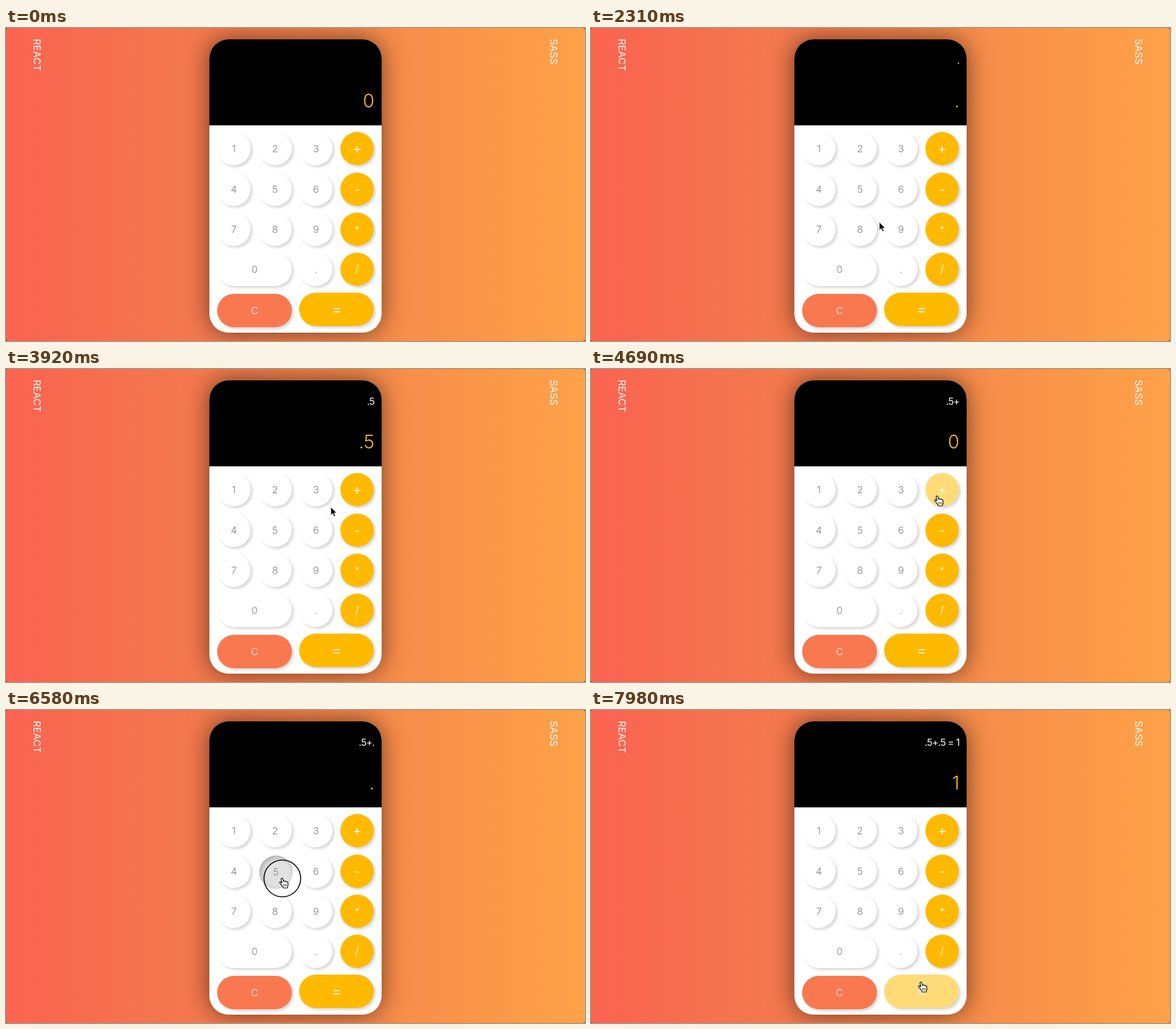
Recreate the animation shown at these times as an HTML page. Size 968 by 524 pixels, loop 8 s.

```html
<!DOCTYPE html>
<html lang="en">
<head>
<meta charset="utf-8">
<title>Calculator</title>
<style>
html, body { margin: 0; width: 100%; height: 100%; overflow: hidden; background: #7a4030; }
#stage {
  position: absolute; left: 0; top: 0; width: 968px; height: 524px; overflow: hidden; border-radius: 4px;
  background: linear-gradient(90deg, #fb6450, #f8694f 92px, #f4734e 222px, #f5804c 440px, #f8904a 700px, #fc9a48 850px, #fea148);
}
#calc {
  position: absolute; left: 340px; top: 19px; width: 288px; height: 491px;
  border-radius: 32px; background: #fff; box-shadow: 0 0 40px rgba(0,0,0,.55);
}
#screen { height: 144px; background: #000; border-radius: 32px 32px 0 0; }
.key {
  position: absolute; height: 56px; border-radius: 28px; background: #fff;
  box-shadow: 3px 3px 4px #d6d6d6;
}
.op { background: #ffba00; }
.clear { background: #f97850; }
.num.on { background: #e1e1e1; transform: translate(1.5px, 1.5px); box-shadow: inset 3px 3px 9px rgba(0,0,0,.24); }
.op.on { background: #ffdb78; }
.clear.on { background: #fbb39b; }
svg { position: absolute; left: 0; top: 0; font-family: Inter, "Open Sans", sans-serif; font-weight: 300; }
.label { text-anchor: middle; }
.side { font-size: 16.5px; fill: #fff; font-weight: 400; }
#expr { font-size: 16px; letter-spacing: -.7px; fill: #fff; text-anchor: end; font-weight: 400; }
#value { font-size: 31px; fill: #fdb82c; text-anchor: end; }
</style>
</head>
<body>
<div id="stage">
  <div id="calc"><div id="screen"></div></div>
  <div id="keys"></div>
  <svg width="968" height="524" viewBox="0 0 968 524">
    <text class="side" transform="translate(46 18) rotate(90)">REACT</text>
    <text class="side" transform="translate(910 18) rotate(90)">SASS</text>
    <text id="expr" x="616" y="60"></text>
    <text id="value" x="616" y="133"></text>
    <g id="labels"></g>
    <circle id="ring" fill="none" stroke="#000" stroke-width="1.6"/>
    <g id="cursor">
      <path id="arrow" d="M0 0V13.8L3.2 10.8L5.5 16L7.8 15L5.6 10H9.8Z" fill="#000" stroke="#fff" stroke-width=".9"/>
      <g id="hand" stroke="#000" stroke-linejoin="round" stroke-linecap="round">
        <path d="M-2 1.2C-2.2-.6 .6-.9 1 .9L2 5C2.6 4 4.3 4.1 4.6 5.2C5.4 4.4 6.8 4.6 7.1 5.8C8 5.2 9.2 5.8 9.3 7L9.6 10.5C9.6 12.5 8.8 13.5 8.4 16H1.8C1.5 14-1 12-2.6 9.6C-4.4 7.4-5 6.4-4 5.8C-2.8 5.2-1.6 6.6-.6 7.6Z" fill="#fff" stroke-width="1.2"/>
        <path d="M2.4 9.8V13M4.7 9.8V13M7 9.8V13" stroke-width=".8"/>
      </g>
    </g>
  </svg>
</div>
<script>
const LOOP = 8000, STEP = 70;
const $ = id => document.getElementById(id);
const cols = [353, 421.7, 490.3, 559], rows = [174, 241.5, 308.5, 375.5];
const keys = [];

function addKey(text, x, y, w, kind, size = 16.5, drop = 6) {
  const el = document.createElement('div');
  el.className = 'key ' + kind;
  Object.assign(el.style, { left: x + 'px', top: y + 'px', width: w + 'px' });
  $('keys').append(el);
  const label = document.createElementNS('http://www.w3.org/2000/svg', 'text');
  label.textContent = text;
  label.setAttribute('class', 'label');
  label.setAttribute('x', x + w / 2);
  label.setAttribute('y', y + 28 + drop);
  label.setAttribute('font-size', size);
  label.setAttribute('fill', kind === 'num' ? '#808080' : '#fff');
  $('labels').append(label);
  keys.push({ x, y, w, kind, el, label });
}

for (let n = 0; n < 9; n++) addKey(n + 1, cols[n % 3], rows[n / 3 | 0], 56, 'num');
addKey('0', cols[0], rows[3], 125, 'num');
addKey('.', cols[2], rows[3], 56, 'num');
// operator: text, font size, baseline below the centre
[['+', 24, 8.3], ['-', 21, 8.5], ['*', 16, 6], ['/', 18, 6.5]]
  .forEach(([s, size, drop], i) => addKey(s, cols[3], rows[i], 56, 'op', size, drop));
addKey('C', cols[0], 444.5, 125, 'clear');
addKey('=', cols[2], 443, 125, 'op', 26, 8.5);

const ease = {
  in: u => u * u,
  out: u => 1 - (1 - u) * (1 - u),
  both: u => u * u * (3 - 2 * u)
};
// pointer: time, x, y, easing on the way there
const path = [
  [140, 545, 534], [980, 522, 409, 'out'], [1470, 522, 409], [1890, 518, 396, 'both'], [2030, 518, 396],
  [2310, 482, 325, 'in'], [2940, 455, 278, 'out'], [3570, 455, 278], [3920, 543, 231, 'in'],
  [4480, 579, 213, 'out'], [4830, 579, 213], [5670, 521, 405, 'both'], [5880, 521, 405],
  [6510, 462, 282, 'both'], [6930, 462, 282], [7770, 552, 456, 'both'], [8000, 552, 456]
];
// press time, time the display answers, expression, value
const clicks = [
  [980, 1120, '.', '.'], [3430, 3500, '.5', '.5'], [4550, 4690, '.5+', '0'],
  [5740, 5880, '.5+.', '.'], [6510, 6650, '.5+.5', '.5'], [7840, 7980, '.5+.5 = 1', '1']
];

function pointer(t) {
  const i = Math.max(1, path.findIndex(p => p[0] >= t));
  const [t0, x0, y0] = path[i - 1], [t1, x1, y1, kind] = path[i];
  const k = ease[kind || 'both']((t - t0) / (t1 - t0));
  return [x0 + (x1 - x0) * k, y0 + (y1 - y0) * k];
}

function inside(k, x, y) {
  const nearX = Math.min(Math.max(x, k.x + 28), k.x + k.w - 28);
  return Math.hypot(x - nearX, y - k.y - 28) < 28;
}

function show(el, on) { el.style.display = on ? '' : 'none'; }

function draw(t) {
  const visible = t >= 210;
  const [x, y] = visible ? pointer(t) : [-50, -50];
  let hover = false;
  for (const k of keys) {
    const on = t >= 1050 && inside(k, x, y);
    hover = hover || on;
    k.el.classList.toggle('on', on);
    k.label.setAttribute('transform', on && k.kind === 'num' ? 'translate(1.5 1.5)' : '');
  }
  show($('cursor'), visible);
  show($('arrow'), !hover);
  show($('hand'), hover);
  $('cursor').setAttribute('transform', `translate(${x} ${y})`);

  const last = clicks.filter(c => t >= c[1]).pop();
  $('expr').textContent = last ? last[2] : '';
  $('value').textContent = last ? last[3] : '0';

  const press = clicks.find(c => t >= c[0] && t < c[1]);
  show($('ring'), press);
  if (press) {
    $('ring').setAttribute('cx', x);
    $('ring').setAttribute('cy', y);
    $('ring').setAttribute('r', 21.7 + 9 * (t - press[0]) / STEP);
  }
}

const start = performance.now();
function tick() {
  const t = (performance.now() - start) % LOOP;
  draw(Math.floor(t / STEP) * STEP);
  requestAnimationFrame(tick);
}
tick();
</script>
</body>
</html>
```
